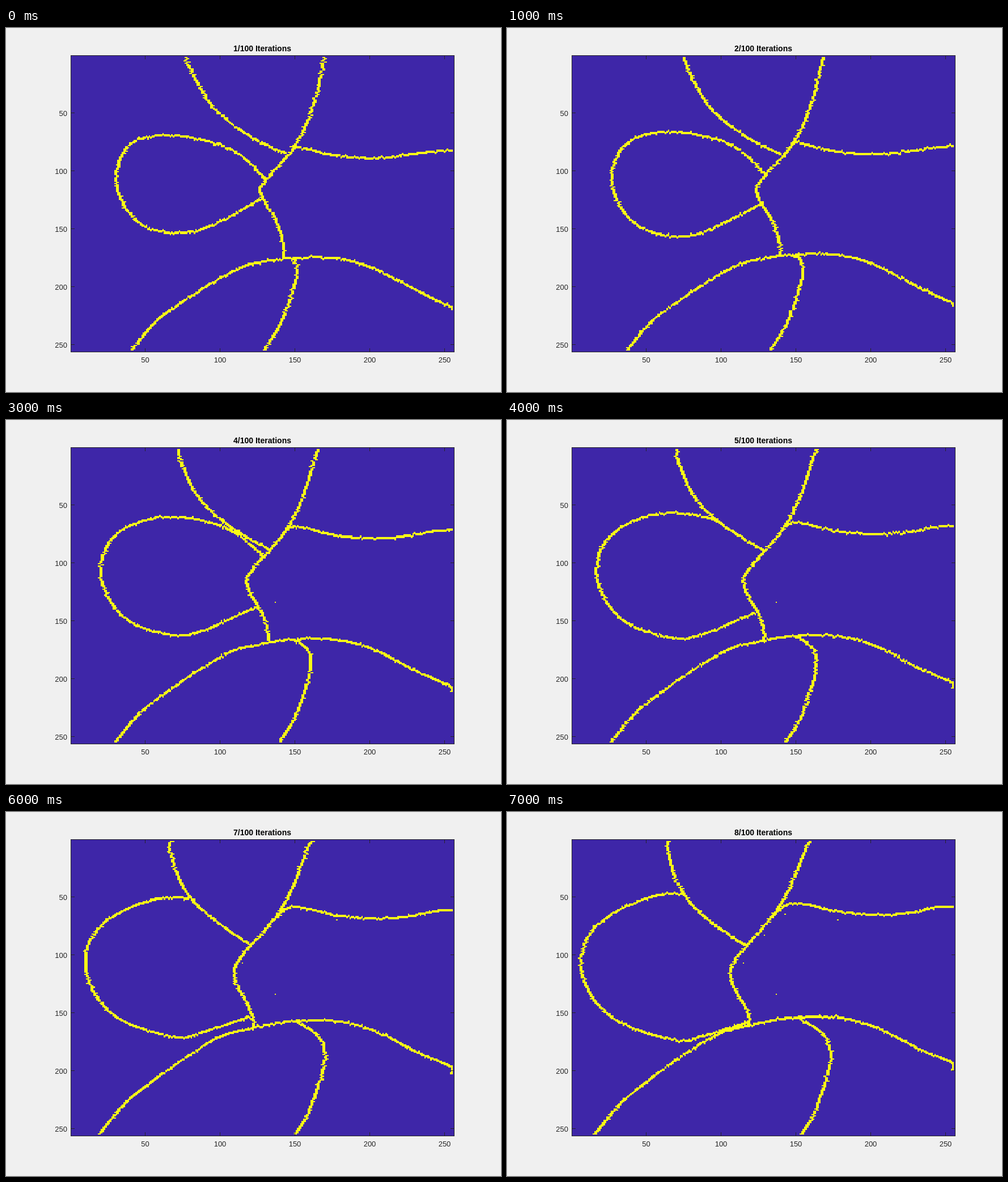
Recreate the animation shown at these times as an HTML page with a canvas. Size 873 px wide and 641 px high, loop 8000 ms.

```html
<!DOCTYPE html>
<html>
<head>
<meta charset="utf-8">
<style>
  html, body { margin: 0; width: 100%; height: 100%; overflow: hidden; background: #f0f0f0; }
  canvas { display: block; }
</style>
</head>
<body>
<canvas width="873" height="641"></canvas>
<script>
const ctx = document.querySelector('canvas').getContext('2d');
const LEFT = 114.5, TOP = 48.5, WIDTH = 676, HEIGHT = 522, CELLS = 256;
const STEPS = 8, STEP_MS = 1000;
const cellX = i => Math.round(LEFT + i * WIDTH / CELLS);
const cellY = j => Math.round(TOP + j * HEIGHT / CELLS);
const column = x => (x - LEFT) * CELLS / WIDTH;
const row = y => (y - TOP) * CELLS / HEIGHT;

// Key points drift steadily from (x, y) at the first step to (x, y) at the last.
const upperLeft = [
  [317, 49, 288, 48], [325, 73, 283, 66], [367, 141, 305, 133], [434, 193, 346, 182],
  [494, 220, 422, 237]];
const spine = [
  [562, 49, 546, 49], [560, 60, 531, 56], [541, 140, 499, 133], [508, 210, 465, 187],
  [457, 269, 408, 253], [449, 292, 394, 292], [475, 338, 420, 343], [489, 380, 426, 362],
  [489, 406, 427, 373]];
const right = [
  [508, 210, 465, 187], [514, 209, 505, 160], [585, 225, 585, 175], [655, 229, 655, 181],
  [717, 222, 715, 177], [757, 217, 750, 168], [788, 215, 788, 166]];
const loop = [
  [457, 267, 455, 211], [409, 220, 409, 178], [350, 198, 350, 151], [277, 189, 270, 146],
  [222, 203, 185, 180], [198, 240, 137, 230], [198, 290, 137, 300], [235, 344, 190, 365],
  [297, 361, 297, 402], [360, 349, 345, 394], [454, 298, 426, 370]];
const arc = [
  [222, 568, 155, 568], [275, 508, 215, 500], [400, 428, 350, 403], [465, 410, 430, 375],
  [512, 405, 505, 362], [580, 406, 580, 361], [645, 422, 650, 379], [722, 461, 722, 415],
  [782, 490, 784, 441], [787, 495, 786, 455]];
const lower = [
  [500, 405, 514, 362], [511, 412, 558, 393], [512, 440, 570, 440], [489, 510, 544, 525],
  [456, 568, 519, 568]];
// Stray cells: x, y, first step
const specks = [[474, 320, 3], [416, 265, 6], [583, 191, 7], [490, 179, 8], [453, 217, 8]];

// Once the loop reaches the upper left edge, its upper branch stops there.
const loopLimit = step => step > 4 ? 300 + 72 * 0.55 ** (step - 5) : Infinity;

function jitter(line, step) {
  const v = Math.sin(line * 12.9898 + step * 37.719) * 43758.5453;
  return Math.round((v - Math.floor(v) - 0.5) * 1.25);
}

function cell(i, j) {
  if (i < 1 || j < 1 || i > 254 || j > 254) return;
  const x = cellX(i), y = cellY(j);
  ctx.fillRect(x, y, cellX(i + 1) - x, cellY(j + 1) - y);
}

// Two cells across the line, nudged a little from row to row.
function stamp(x, y, steep, step) {
  if (steep) {
    const j = Math.floor(y), i = Math.round(x) - 1 + jitter(j, step);
    cell(i, j);
    cell(i + 1, j);
  } else {
    const i = Math.floor(x), j = Math.round(y) - 1 + jitter(i, step);
    cell(i, j);
    cell(i, j + 1);
  }
}

function spline(a, b, c, d, t) {
  return b + t / 2 * (c - a + t * (2 * a - 5 * b + 4 * c - d + t * (3 * (b - c) + d - a)));
}

function drawCurve(points, step, limit = Infinity) {
  const f = (step - 1) / (STEPS - 1);
  const p = points.map(([x, y, u, v]) => [column(x + (u - x) * f), row(y + (v - y) * f)]);
  let [lastX, lastY] = p[0];
  for (let s = 0; s < p.length - 1; s++) {
    const b = p[s], c = p[s + 1], a = p[s - 1] || b, d = p[s + 2] || c;
    for (let t = 1 / 128; t <= 1; t += 1 / 128) {
      const x = spline(a[0], b[0], c[0], d[0], t);
      const y = spline(a[1], b[1], c[1], d[1], t);
      const steep = Math.abs(x - lastX) < Math.abs(y - lastY);
      if (x < column(limit) || y > CELLS / 2) stamp(x, y, steep, step);
      lastX = x;
      lastY = y;
    }
  }
}

function drawAxes() {
  ctx.strokeStyle = ctx.fillStyle = '#262626';
  ctx.strokeRect(LEFT, TOP, WIDTH, HEIGHT);
  ctx.font = '13px "Liberation Sans", Arial, sans-serif';
  for (let v = 50; v <= 250; v += 50) {
    const x = Math.floor(LEFT + (v - 0.5) * WIDTH / CELLS);
    const y = Math.floor(TOP + (v - 0.5) * HEIGHT / CELLS);
    for (const end of [0, 1]) {
      ctx.fillRect(x, TOP - 0.5 + end * (HEIGHT - 6), 1, 7);
      ctx.fillRect(LEFT - 0.5 + end * (WIDTH - 6), y, 7, 1);
    }
    ctx.textAlign = 'center';
    ctx.fillText(v, x + 0.5, 589);
    ctx.textAlign = 'right';
    ctx.fillText(v, 108, y + 6);
  }
}

function draw(step) {
  ctx.fillStyle = '#f0f0f0';
  ctx.fillRect(0, 0, 873, 641);
  ctx.fillStyle = '#3e26a8';
  ctx.fillRect(LEFT, TOP, WIDTH, HEIGHT);
  ctx.fillStyle = '#f9fb15';
  for (const curve of [upperLeft, spine, right, arc, lower]) drawCurve(curve, step);
  drawCurve(loop, step, loopLimit(step));
  for (const [x, y, first] of specks) {
    if (step >= first) cell(Math.floor(column(x)), Math.floor(row(y)));
  }
  drawAxes();
  ctx.fillStyle = '#000';
  ctx.textAlign = 'center';
  ctx.font = 'bold 14px "Liberation Sans", Arial, sans-serif';
  ctx.fillText(`${step}/100 Iterations`, 452, 41);
}

let shown = 0;
function tick() {
  const step = Math.floor(performance.now() / STEP_MS) % STEPS + 1;
  if (step !== shown) draw(shown = step);
  requestAnimationFrame(tick);
}
tick();
</script>
</body>
</html>
```
